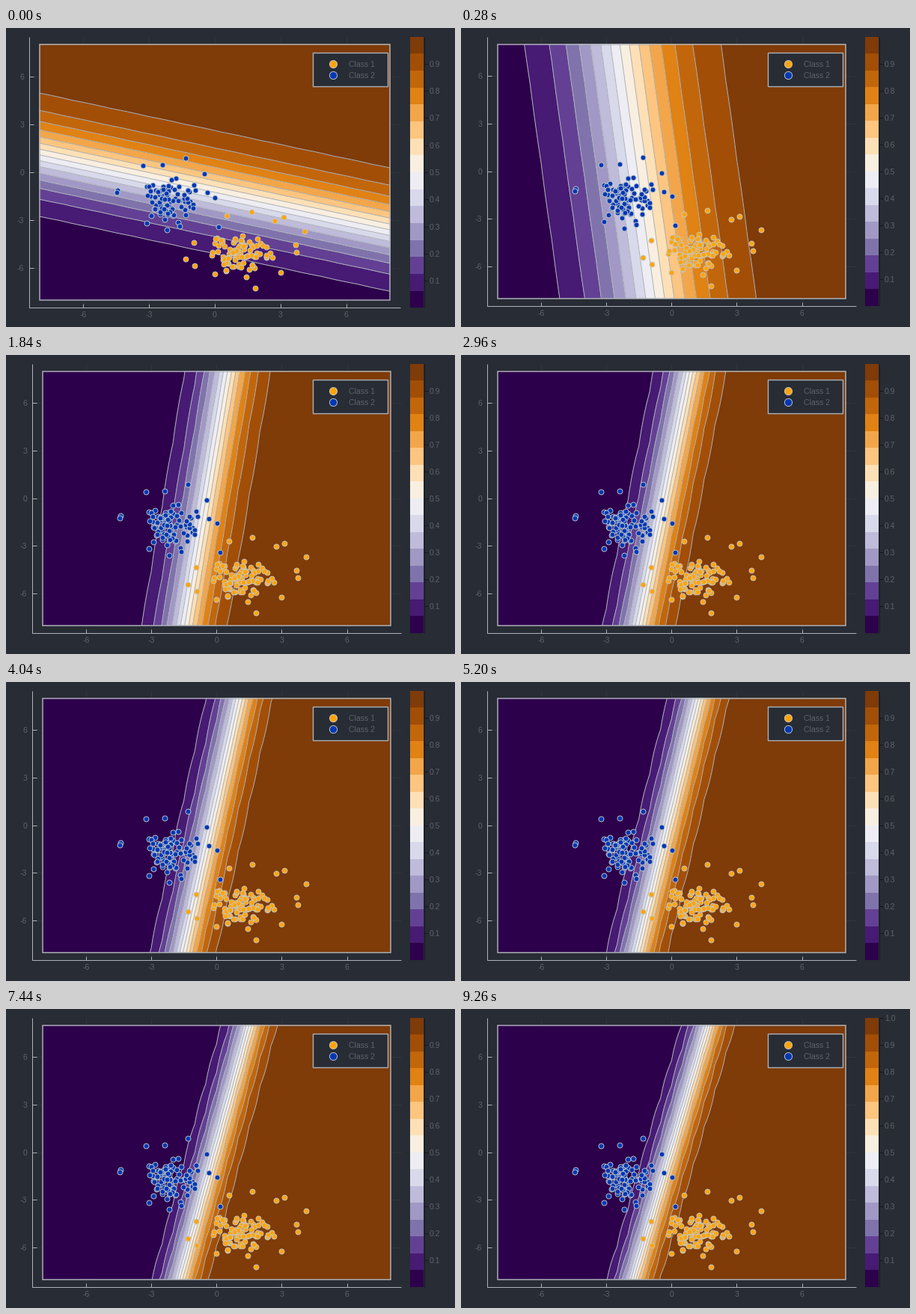
Write a matplotlib script that moves like this. It is 600 px wide and 400 px high and loops after 9280 ms.

```python
import numpy as np
import matplotlib.pyplot as plt
from matplotlib.animation import FuncAnimation
from matplotlib.patches import Rectangle

W, H, DPI = 600, 400, 100
PT = 72 / DPI
BG, FG, DIM, DARK = "#282c34", "#adb2b7", "#5d626b", "#14161a"
ORANGE, BLUE = "#ffa50a", "#0038b4"
BANDS = 16
COLORS = plt.get_cmap("PuOr_r")(np.linspace(0, 1, BANDS))
LIMIT, REACH = 8, 8.48

plt.rcParams["font.family"] = "Liberation Sans"
plt.rcParams["font.size"] = 10.5 * PT

rng = np.random.default_rng(4)


def cluster(center, spread, count, outliers):
    """A round random core and a few points that stand apart."""
    core = rng.normal(size=(2 * count, 2))
    core = core[np.hypot(*core.T) < 2.1][:count]
    return np.vstack([center + core * spread, outliers])


class1 = cluster((1.1, -5.2), (.75, .78), 88, [
    (1.66, -2.46), (.56, -2.70), (2.73, -3.03), (3.14, -2.82), (4.11, -3.71),
    (3.69, -4.54), (3.73, -5.01), (3.00, -6.24), (1.83, -7.23), (-.92, -5.86),
    (-1.33, -5.44), (-.95, -4.37)])
class2 = cluster((-2.0, -1.6), (.72, .75), 84, [
    (-4.43, -1.10), (-4.46, -1.26), (-3.26, .41), (-2.40, .46), (-1.33, .88),
    (-.47, -.11), (-.34, -1.28), (.01, -1.57), (.18, -3.41), (-1.61, -3.36),
    (-2.19, -3.60), (-3.12, -3.17)])

grid = np.arange(-LIMIT, LIMIT + .25, .5)
GX, GY = np.meshgrid(grid, grid)

fig = plt.figure(figsize=(W / DPI, H / DPI), dpi=DPI, facecolor=BG)
ax = fig.add_axes([0, 0, 1, 1])


def to_stage(layout, x, y):
    cx, cy, ux, uy = layout
    return cx + np.asarray(x) * ux, cy - np.asarray(y) * uy


def line(xs, ys, color=FG, lw=1.0, **kw):
    return ax.plot(xs, ys, color=color, lw=lw * PT, solid_capstyle="butt", **kw)[0]


def label(x, y, text, ha):
    return ax.text(x, y, text, color=DIM, ha=ha, va="center_baseline")


def dots(x, y, color, size, z):
    ax.scatter(x, y, s=(size * PT) ** 2, c=color, edgecolors="#c3c8cc",
               linewidths=.9 * PT, zorder=z)


def box(x0, y0, x1, y1, z, **kw):
    ax.add_patch(Rectangle((x0, y0), x1 - x0, y1 - y0, zorder=z, **kw))


def draw_axes(layout):
    (left, right), (bottom, top) = to_stage(layout, (-REACH, REACH), (-REACH, REACH))
    for t in range(-6, 7, 3):
        x, y = to_stage(layout, t, t)
        line((x, x), (top, bottom), lw=.6, alpha=.12, zorder=0)
        line((left, right), (y, y), lw=.6, alpha=.12, zorder=0)
        line((x, x), (bottom - 5, bottom))
        line((left, left + 6), (y, y))
        label(x, bottom + 9, str(t), "center")
        label(left - 6.5, y, str(t), "right")
    line((left, left, right), (top, bottom, bottom))
    return bottom, top


def draw_colorbar(bottom, top):
    """Returns the artists of the topmost tick."""
    edges = np.linspace(bottom, top, BANDS + 1)
    for color, low, high in zip(COLORS, edges, edges[1:]):
        box(540.4, high, 558.4, low, 3, fc=color, lw=0, antialiased=False)
    line((559, 559), (top, bottom), DARK, .8)
    for n in range(1, 11):
        y = bottom + (top - bottom) * n / 10
        tick = line((559, 564.5), (y, y), DARK)
        text = label(566.5, y, f"{n / 10:.1f}", "left")
    return tick, text


def draw_legend():
    box(410, 33, 510, 78, 7, fc=BG, ec=FG, lw=1.4 * PT)
    for y, color, name in ((48, ORANGE, "Class 1"), (63, BLUE, "Class 2")):
        dots([437], [y], color, 10.2, 8)
        label(458, y, name, "left").set_zorder(8)


def draw_base(layout):
    """Everything but the contours."""
    ax.cla()
    ax.axis("off")
    ax.set(xlim=(.5, W + .5), ylim=(H, 0))
    ax.set_autoscale_on(False)
    bottom, top = draw_axes(layout)
    (x0, x1), (y0, y1) = to_stage(layout, (-LIMIT, LIMIT), (LIMIT, -LIMIT))
    box(x0, y0, x1, y1, 4, fill=False, ec=FG, lw=1.5 * PT)
    dots(*to_stage(layout, *class1.T), ORANGE, 6.9, 5)
    dots(*to_stage(layout, *class2.T), BLUE, 6.9, 6)
    draw_legend()
    return draw_colorbar(bottom, top)


def weights(step):
    """Classifier weights: a fast first turn, then ever slower growth."""
    turn = np.exp(-step / 2.8)
    wx = .588 * np.log(step + 5) - .85 + .109 * turn
    wy = .085 - .0405 * np.sqrt(step) + .616 * turn
    bias = 1.133 - .0742 * np.sqrt(step) - .25 * turn
    return wx, wy, bias


def draw_contours(layout, step):
    wx, wy, bias = weights(step)
    prob = 1 / (1 + np.exp(-(wx * GX + wy * GY + bias)))
    levels = np.linspace(prob.min(), prob.max(), BANDS + 1)[1:-1]
    x, y = to_stage(layout, GX, GY)
    fill = ax.contourf(x, y, prob, [-1, *levels, 2], colors=COLORS, zorder=1)
    rims = ax.contour(x, y, prob, levels, colors=FG, linewidths=PT, zorder=2)
    return fill, rims


# Center and pixels per unit; the first step has its own margins.
FIRST = (279.5, 193, 29.3, 21.4)
REST = (281.75, 191.75, 29.06, 21.22)
FULL_SCALE = 163  # step at which the scale reaches 1.0
state = {"step": None, "layout": None, "contours": (), "top": ()}


def step_of(i):
    """Three training steps per seven ticks, held for 1, 5 and 1 ticks."""
    cycle, tick = divmod(i, 7)
    return 3 * cycle + (tick > 0) + (tick > 5)


def update(i):
    step = step_of(i)
    if step == state["step"]:
        return []
    layout = REST if step else FIRST
    if layout != state["layout"]:
        state["top"] = draw_base(layout)
    else:
        for contour in state["contours"]:
            contour.remove()
    for artist in state["top"]:
        artist.set_visible(step >= FULL_SCALE)
    state.update(step=step, layout=layout, contours=draw_contours(layout, step))
    return []


anim = FuncAnimation(fig, update, frames=464, interval=20, repeat=True,
                     repeat_delay=0, init_func=lambda: [], blit=False)
plt.show()
```
